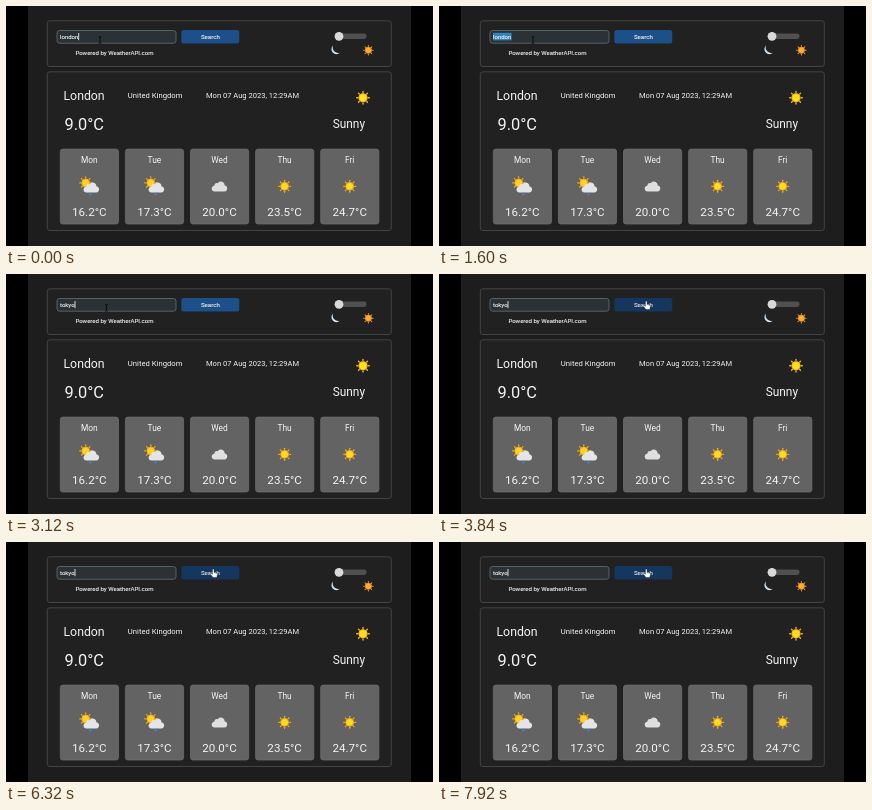
An HTML page for the animation above (8 s loop, 427x240 px).

```html
<!DOCTYPE html>
<html lang="en">
<head>
<meta charset="utf-8">
<title>Weather</title>
<style>
html, body { margin: 0; width: 100%; height: 100%; overflow: hidden; background: #000; }
svg { display: block; width: 100vw; height: 100vh; }
text { font-family: Roboto, "Liberation Sans", sans-serif; fill: #f4f4f4; white-space: pre; }
.mid { text-anchor: middle; }
.small { stroke: #f4f4f4; stroke-width: .12; }
.panel { fill: #212121; stroke: #444; stroke-width: 1; }
.card { fill: #636363; stroke: #6c6c6c; stroke-width: .8; }
</style>
</head>
<body>
<svg viewBox="0 0 427 240">
  <defs>
    <g id="sun">
      <g id="rays" stroke-width="1.3" stroke-linecap="round"></g>
      <circle r="3.9"/>
    </g>
    <path id="puff" d="M-4.8 5.2C-8.6 5.2-8.8-.2-5.2-.6C-4.8-3.4-3-3.6-1.8-3.1C.3-6.2 5.2-4.6 5.2-.7C8.8-.4 8.6 5.2 5 5.2Z"/>
    <g id="shower">
      <use href="#sun" x="-3.6" y="-3.4" fill="#ffd21f" stroke="#f5a81c"/>
      <use href="#puff" x="2" y="1" fill="#e3e5e8"/>
      <path d="M1.6 7L.8 8.8" stroke="#3f86c8" stroke-width="1.5" stroke-linecap="round"/>
    </g>
    <use id="cloud" href="#puff" fill="#dedfe0"/>
    <use id="clear" href="#sun" fill="#ffdc1e" stroke="#f0a81c"/>
  </defs>

  <rect x="22" width="383" height="240" fill="#1d1d1d"/>
  <rect class="panel" x="41.3" y="14.8" width="344" height="45.7" rx="2.5"/>
  <rect class="panel" x="41.3" y="65.8" width="344" height="158.7" rx="2.5"/>

  <rect x="51" y="24.5" width="119" height="12.7" rx="2.5" fill="#2b3134" stroke="#5c686b" stroke-width=".9"/>
  <rect id="mark" x="54" y="26.8" width="18.6" height="7.6" fill="#2f83b8"/>
  <text id="query" class="small" x="54" y="32.8" font-size="6"></text>
  <rect id="caret" y="27" width=".8" height="7.2" fill="#fff"/>

  <rect id="button" x="175.3" y="24" width="58" height="13.5" rx="2.5"/>
  <text id="label" class="mid small" x="204.4" y="32.8" font-size="6.2">Search</text>
  <text class="small" x="69.4" y="48.8" font-size="6.05">Powered by WeatherAPI.com</text>

  <rect x="329" y="27.4" width="31.5" height="5.6" rx="2.4" fill="#505050"/>
  <circle cx="333" cy="30.3" r="4.4" fill="#d9d9d9"/>
  <path d="M327 39.6A4.9 4.9 0 1 0 333.8 46.8A5.6 5.6 0 0 1 327 39.6Z" fill="#cfe6fb"/>
  <use href="#sun" transform="translate(362.4 44.2) scale(.8)" fill="#ffad2b" stroke="#e8902a"/>

  <text x="57.5" y="93.5" font-size="12.3">London</text>
  <text x="121.8" y="91.7" font-size="7.7">United Kingdom</text>
  <text x="200" y="91.7" font-size="7.55">Mon 07 Aug 2023, 12:29AM</text>
  <use href="#sun" transform="translate(357 91.8) scale(1.05)" fill="#ffe01a" stroke="#f7b51c"/>
  <text x="58.5" y="123.8" font-size="16.4">9.0°C</text>
  <text x="326.7" y="122.2" font-size="11.9">Sunny</text>

  <g id="days"></g>

  <path id="beam" d="M-1.4-3.4Q0-3.4 0-2.4V2.4Q0 3.4-1.4 3.4M1.4-3.4Q0-3.4 0-2.4M0 2.4Q0 3.4 1.4 3.4" fill="none" stroke="#090909" stroke-width=".9"/>
  <path id="hand" d="M-1.3-4Q-.4-4.9.4-4V-.8L3-.2Q3.9.1 3.7 1.2L3.1 4.1H-.7L-3.1 1Q-3.1 0-2.3.1L-1.3.9Z" fill="#fff" stroke="#111" stroke-width=".4"/>
</svg>
<script>
const $ = id => document.getElementById(id);
const LOOP = 8000;

$("rays").innerHTML = Array.from({ length: 8 }, (_, i) =>
  `<path d="M0-5V-6" transform="rotate(${i * 45})"/>`).join("");

$("days").innerHTML = [
  ["Mon", "16.2", "shower"], ["Tue", "17.3", "shower"], ["Wed", "20.0", "cloud"],
  ["Thu", "23.5", "clear"], ["Fri", "24.7", "clear"]
].map(([day, temp, icon], i) => `<g transform="translate(${83.3 + i * 65.1} 0)">
  <rect class="card" x="-29" y="143.1" width="58.2" height="74.9" rx="2.5"/>
  <text class="mid" y="157" font-size="8.4">${day}</text>
  <use href="#${icon}" y="180.3"/>
  <text class="mid" y="210.3" font-size="11.6">${temp}°C</text></g>`).join("");

// time, field text, selected
const typing = [
  [0, "london", false], [800, "london", true], [1840, "t", false],
  [2000, "to", false], [2240, "tok", false], [2480, "toky", false], [2830, "tokyo", false]
];
const travel = { start: 3040, end: 3600, from: [94, 34], to: [207.7, 31.4] };
const ease = p => p * p * (3 - 2 * p);
const show = (el, on) => el.setAttribute("visibility", on ? "visible" : "hidden");

function draw(t) {
  const [since, text, selected] = typing.filter(s => s[0] <= t).pop();
  const query = $("query");
  if (query.textContent !== text) query.textContent = text;
  show($("mark"), selected);
  $("caret").setAttribute("x", 54 + query.getComputedTextLength());
  show($("caret"), !selected && (t - since) % 1000 < 500);

  const p = ease(Math.min(1, Math.max(0, (t - travel.start) / (travel.end - travel.start))));
  const [x, y] = travel.from.map((a, i) => a + (travel.to[i] - a) * p);
  const hover = x > 175;
  for (const id of ["beam", "hand"]) $(id).setAttribute("transform", `translate(${x} ${y})`);
  show($("beam"), !hover);
  show($("hand"), hover);
  $("button").setAttribute("fill", hover ? "#14365f" : "#1d4f88");
  $("label").style.fill = hover ? "#d3dae2" : "#f4f4f4";
}

const began = performance.now();
function tick() {
  draw((performance.now() - began) % LOOP);
  requestAnimationFrame(tick);
}
tick();
</script>
</body>
</html>
```
